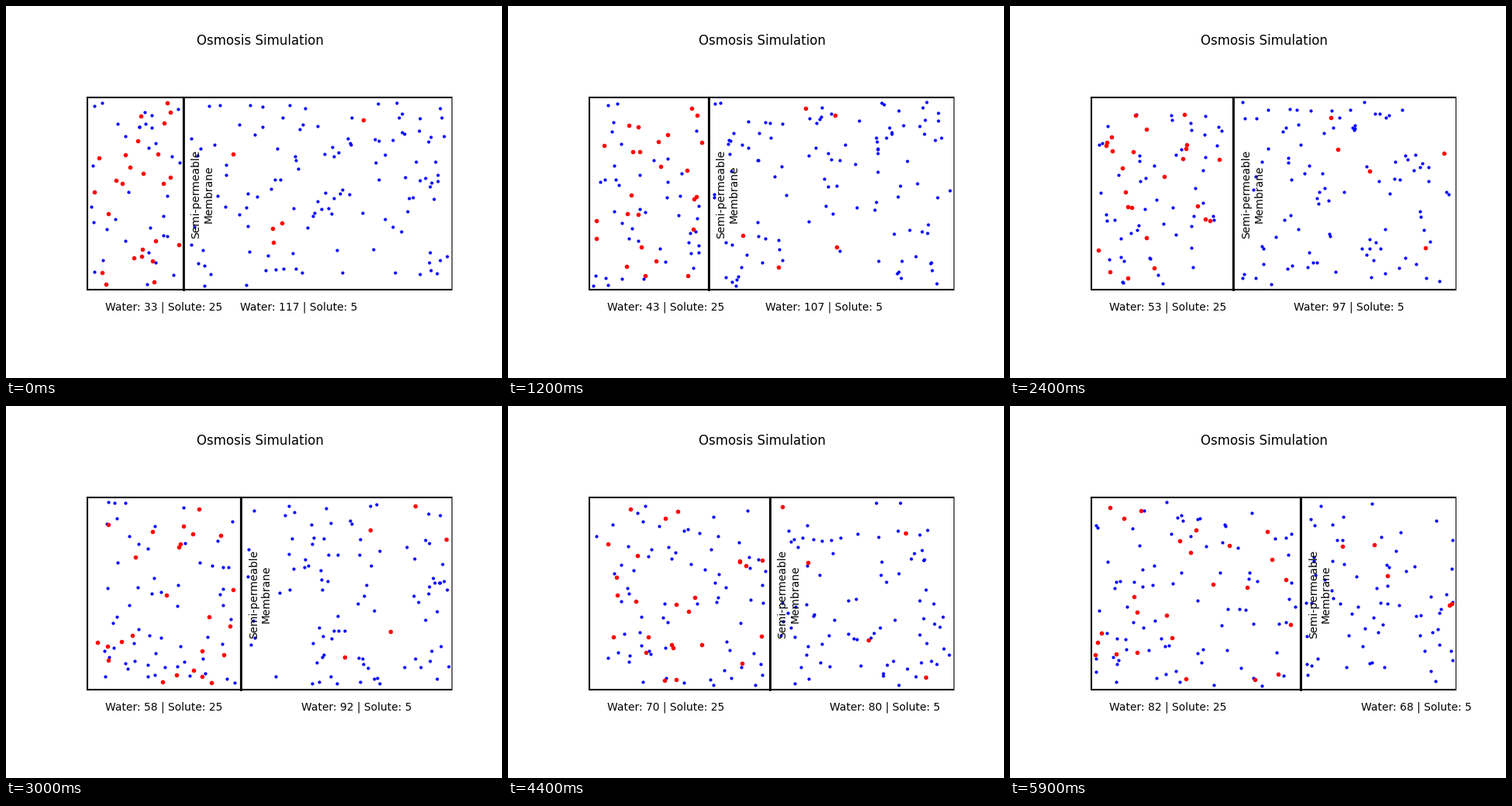
A matplotlib script for the animation above (6000 ms loop, 640x480 px).

```python
import numpy as np
import matplotlib.pyplot as plt
from matplotlib.animation import FuncAnimation
from matplotlib.patches import Rectangle

FRAMES, INTERVAL = 60, 100
WATER, WATER_LEFT = 150, 33
SOLUTE_LEFT, SOLUTE_RIGHT = 25, 5
WIDTH, HEIGHT = 1.9, 1.0
START, STEP = 0.5, 0.01
MARGIN = 0.02
LABEL_Y = -0.104

plt.rcParams["font.family"] = "DejaVu Sans"
fig = plt.figure(figsize=(6.4, 4.8), dpi=100, facecolor="white")
ax = fig.add_axes([0.125, 0.11, 0.775, 0.77])
half = 369.6 / 496  # keeps both axes at the same scale
ax.set_xlim(-0.1, 1.9)
ax.set_ylim(0.5 - half, 0.5 + half)
ax.axis("off")
ax.set_title("Osmosis Simulation", fontsize=12, pad=5.28)

left_box = ax.add_patch(Rectangle((0, 0), START, HEIGHT, fill=False, lw=1.5))
right_box = ax.add_patch(Rectangle((START, 0), WIDTH - START, HEIGHT, fill=False, lw=1.5))
water_dots, = ax.plot([], [], "bo", markersize=2)
solute_dots, = ax.plot([], [], "ro", markersize=3)
membrane, = ax.plot([START, START], [0, HEIGHT], "k-", lw=2)
membrane_label = ax.text(START + 0.1, 0.5, "Semi-permeable\nMembrane",
                         rotation=90, ha="center", va="center", fontsize=10)
left_label = ax.text(0.4, LABEL_Y, "", ha="center", fontsize=10)
right_label = ax.text(START + 0.6, LABEL_Y, "", ha="center", fontsize=10)


def scatter(rng, left, right, wall):
    """Random points, `left` of them before the wall and `right` beyond it."""
    x = np.concatenate([rng.uniform(MARGIN, wall - MARGIN, left),
                        rng.uniform(wall + MARGIN, WIDTH - MARGIN, right)])
    y = rng.uniform(MARGIN, HEIGHT - MARGIN, left + right)
    return x, y


def update(i):
    rng = np.random.default_rng(i)
    wall = START + STEP * i
    left = WATER_LEFT + int(i * 5 / 6 + 0.5)
    right = WATER - left
    left_box.set_width(wall)
    right_box.set_x(wall)
    right_box.set_width(WIDTH - wall)
    water_dots.set_data(*scatter(rng, left, right, wall))
    solute_dots.set_data(*scatter(rng, SOLUTE_LEFT, SOLUTE_RIGHT, wall))
    membrane.set_xdata([wall, wall])
    membrane_label.set_x(wall + 0.1)
    left_label.set_text(f"Water: {left} | Solute: {SOLUTE_LEFT}")
    right_label.set_text(f"Water: {right} | Solute: {SOLUTE_RIGHT}")
    right_label.set_x(wall + 0.6)
    return (left_box, right_box, water_dots, solute_dots, membrane,
            membrane_label, left_label, right_label)


anim = FuncAnimation(fig, update, frames=FRAMES, interval=INTERVAL, repeat=True)
plt.show()
```
